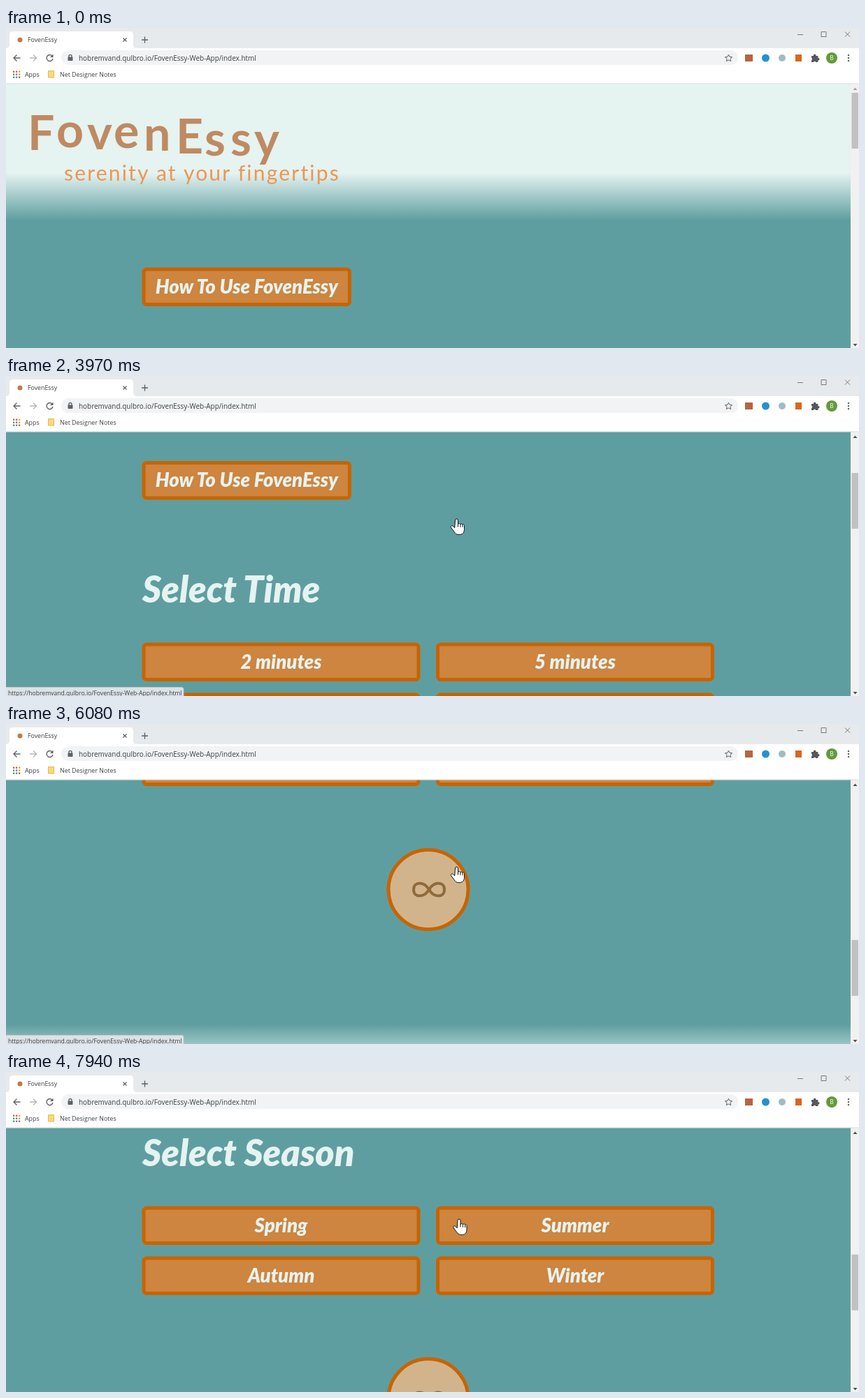
These frames come from a looping animation (1220x459 px, 8000 ms). An HTML page:

```html
<!DOCTYPE html>
<html lang="en">
<head>
<meta charset="utf-8">
<title>FovenEssy</title>
<style>
html, body { margin: 0; width: 100%; height: 100%; overflow: hidden; background: #fff; }
svg { display: block; width: 1220px; height: 459px; }
.ui { font-family: "Open Sans", "Noto Sans", sans-serif; fill: #3c4043; }
.script { font: italic 900 27.5px Lato, sans-serif; fill: #e5f3f1; }
.mid { text-anchor: middle; }
.title { font-size: 52px; }
.foot { fill: #c86400; }
.at { font: 800 57px "Open Sans", sans-serif; }
.brand { font: 700 68px Lato, sans-serif; fill: #bf8a61; }
.tag { font: 400 30px Lato, sans-serif; letter-spacing: 2.2px; fill: #ef9550; }
.btn { fill: #cd853f; stroke: #c86400; stroke-width: 5; }
.line { fill: none; stroke: #5f6368; stroke-width: 1.4; }
</style>
</head>
<body>
<svg viewBox="0 0 1220 459">
  <defs>
    <linearGradient id="sky" gradientUnits="userSpaceOnUse" x1="0" y1="0" x2="0" y2="2000">
      <stop offset=".104" stop-color="#e5f3f1"/>
      <stop offset=".138" stop-color="#5f9ea0"/>
      <stop offset=".7365" stop-color="#5f9ea0"/>
      <stop offset=".768" stop-color="#e5f3f1"/>
    </linearGradient>
  </defs>

  <g id="page">
    <rect width="1208" height="2000" fill="url(#sky)"/>
    <text class="brand" x="31 72 116 154 197 243 284 321 355" y="175 171 174 172 176 180 183 183 184">FovenEssy</text>
    <text class="tag" x="83" y="219">serenity at your fingertips</text>
    <g id="buttons"></g>
    <text class="script title" x="195" y="546.5">Select Time</text>
    <text class="script title" x="195" y="945.5">Select Season</text>
    <circle cx="604" cy="1279.5" r="57" fill="#d2b48c" stroke="#c86400" stroke-width="5"/>
    <path d="M605 1279.5c-7-12-22-12-22 0s15 12 22 0s22-12 22 0s-15 12-22 0z" fill="none" stroke="#8f6a3c" stroke-width="4"/>
    <g class="script mid" id="footer">
      <text class="foot" id="link" x="604" y="1522">www.Fovenessy.com</text>
      <text class="foot" x="604" y="1661">©FovenEssy 2020</text>
      <text class="foot" x="604" y="1701">All rights reserved</text>
      <text class="foot" x="605" y="1740">Web App built by Bram Toldever</text>
    </g>
    <text class="foot mid at" x="730" y="1593">@</text>
  </g>

  <g id="scrollbar">
    <rect x="1208" y="80" width="12" height="379" fill="#f1f1f1"/>
    <rect id="thumb" x="1209.5" y="93" width="9.5" height="80" fill="#c1c1c1"/>
    <path id="up" d="M1211.5 89l3-3.5 3 3.5z"/>
    <path id="down" d="M1211.5 453l3 3.5 3-3.5z"/>
  </g>

  <g id="status" class="ui">
    <path d="M-1 446.5H251q3 0 3 3V460H-1z" fill="#dee1e6" stroke="#c4c8cc" stroke-width=".8"/>
    <text x="3" y="457.5" font-size="8.6">https://hobremvand.qulbro.io/FovenEssy-Web-App/index.html</text>
  </g>

  <g id="browser" class="ui">
    <rect width="1220" height="30" fill="#e7eaed"/>
    <rect y="29" width="1220" height="51" fill="#fff"/>
    <rect y="79.3" width="1220" height="1.2" fill="#dfe2e4"/>
    <path d="M0 29q5 0 5-5V10q0-5 5-5H177q5 0 5 5V24q0 5 5 5z" fill="#fff"/>
    <circle cx="20" cy="17" r="3.5" fill="#c4784a"/>
    <text x="31" y="20" font-size="8.8">FovenEssy</text>
    <path class="line" d="M167.500 14.500l5 5m0-5l-5 5M194 17h9m-4.500-4.500v9"/>
    <path d="M1132 9.500h8M1166 5.500h7v7h-7zM1200 5.500l7 7m0-7l-7 7" fill="none" stroke="#777"/>
    <path class="line" d="M20.500 43H11m4.500-4.500L11 43l4.500 4.500"/>
    <path class="line" style="stroke:#b4b7ba" d="M34 43h9.500M39 38.500l4.500 4.500-4.500 4.500"/>
    <path class="line" d="M66 40a4.500 4.500 0 1 0 1 4"/>
    <path d="M67.500 37.500v4.500h-4.500z" fill="#5f6368"/>
    <rect x="79" y="32" width="968" height="21" rx="10.5" fill="#f1f3f4"/>
    <rect x="88.5" y="41.5" width="7" height="5.5" rx=".8" fill="#5f6368"/>
    <path class="line" d="M90 42v-1.500a2 2 0 0 1 4 0V42"/>
    <text x="104" y="46.5" font-size="9.95">hobremvand.qulbro.io/FovenEssy-Web-App/index.html</text>
    <path class="line" style="stroke-width:1" d="M1033.500 38l1.500 3.400 3.600.3-2.700 2.400.8 3.600-3.200-1.900-3.200 1.900.8-3.600-2.700-2.400 3.600-.3z"/>
    <rect x="1057" y="38" width="11" height="10" fill="#b8643f"/>
    <circle cx="1086.5" cy="43" r="5.5" fill="#2492cf"/>
    <circle cx="1110" cy="43" r="5" fill="#9fbcc3"/>
    <rect x="1129" y="38" width="9" height="10" fill="#d9661f"/>
    <path d="M1152 40h3a1.800 1.800 0 1 1 3.400 0h3v3.200a1.700 1.700 0 1 1 0 3.300V49h-3.200a1.700 1.700 0 0 0-3.200 0h-3v-3a1.700 1.700 0 0 0 0-3.200z" fill="#54585c"/>
    <circle cx="1181" cy="43" r="8" fill="#639a3b"/>
    <text class="mid" x="1181" y="46" font-size="8.5" fill="#fff">B</text>
    <g id="dots"></g>
    <text x="27" y="69.5" font-size="8.9">Apps</text>
    <path d="M60.500 61.500h8v9.500h-8z" fill="#fbd977" stroke="#e3b94e"/>
    <text x="77" y="69.5" font-size="8.9">Net Designer Notes</text>
  </g>

  <g id="cursor" stroke="#111" fill="#fff" stroke-linejoin="round">
    <path id="arrow" d="M0 0v16l3.800-3.400 2.500 5.400 2.500-1.100-2.500-5.300H11z"/>
    <g id="hand">
      <path d="M-2 2a2 2 0 0 1 4 0v6c0-2 3.400-2 3.400.4c0-2 3.200-1.800 3.200.4c0-1.600 2.400-1.400 2.400.6v5c0 5-2 8-6.500 8h-2c-3 0-4.300-1.400-6-4l-4.200-5.600c-1.600-2.400.8-4 2.600-2.300l2.300 2.300z"/>
      <path d="M2 8v3.500M5.400 8.400v3.500M8.600 8.800V12" fill="none"/>
    </g>
  </g>
</svg>
<script>
const $ = id => document.getElementById(id);
const LOOP = 8000, MAX_SCROLL = 1326, TRAVEL = 276;

function add(parent, tag, attrs, text) {
  const el = document.createElementNS('http://www.w3.org/2000/svg', tag);
  for (const k in attrs) el.setAttribute(k, attrs[k]);
  if (text) el.textContent = text;
  parent.appendChild(el);
}

function button(x, y, w, label) {
  add($('buttons'), 'rect', { class: 'btn', x: x + 2.5, y: y + 2.5, width: w - 5, height: 50.5, rx: 4 });
  add($('buttons'), 'text', { class: 'script mid', x: x + w / 2, y: y + 37 }, label);
}

function grid(y, labels) {
  labels.forEach((s, i) => button(i % 2 ? 615 : 194.5, y + (i >> 1) * 72, 398, s));
}

button(194.5, 343.5, 299.5, 'How To Use FovenEssy');
grid(604, [2, 5, 10, 20, 30, 60].map(n => n + ' minutes'));
grid(1003.5, ['Spring', 'Summer', 'Autumn', 'Winter']);

for (let i = 0; i < 4; i++)
  add($('page'), 'rect', { x: 452 + i * 63.6, y: 1555.5, width: 42, height: 42, rx: 4, fill: '#c86400' });

const tints = ['#d9503f', '#d9503f', '#e0a52e', '#4a9a58', '#4383c9', '#e0a52e', '#4a9a58', '#4383c9', '#d9503f'];
tints.forEach((fill, i) =>
  add($('dots'), 'rect', { x: 10 + (i % 3) * 4, y: 61.5 + Math.floor(i / 3) * 4, width: 2.3, height: 2.3, fill }));
for (let i = 0; i < 3; i++)
  add($('dots'), 'circle', { cx: 1205, cy: 39 + i * 4, r: 1.2, fill: '#5f6368' });

// Number of steps taken so far between times a and b (n in all).
const step = (t, a, b, n) =>
  t < a ? 0 : Math.min(n, 1 + Math.floor((t - a) / (b - a) * (n - 1) + 0.01));

// Wheel gestures: start, end, scroll offset after each step.
const wheel = [
  [3500, 3970, [8, 42, 84, 126, 168, 206, 221.5]],
  [4350, 4900, [230, 268, 312, 358, 405, 450.5, 495, 516.6]],
  [5060, 5290, [528, 600, 690, 738]],
  [5520, 5850, [744.5, 810, 905, 990, 1033]],
  [6080, 6400, [1042, 1120, 1220, 1300, MAX_SCROLL]],
  [7180, 7940, [1320, 1285, 1230, 1180, 1125, 1070, 1010, 955, 900, 850, 811]]
];

function scrollAt(t) {
  let pos = 0;
  for (const [a, b, stops] of wheel) {
    const k = step(t, a, b, stops.length);
    if (k) pos = stops[k - 1];
  }
  return pos;
}

function drawCursor(t, hover) {
  const k = step(t, 1040, 1710, 10);
  const enter = 1 - (1 - Math.max(0, k - 1) / 9) ** 2;
  const nudge = step(t, 2110, 2260, 3) / 3;
  const drift = step(t, 7180, 7940, 11) / 11;
  const x = 1001 - 358 * enter + 1.5 * nudge + 1.5 * hover + 2 * drift;
  const y = 445 - 247 * enter + 7 * nudge + 3 * hover + 3 * drift;
  const onLink = y < 240;
  $('cursor').setAttribute('visibility', k ? 'visible' : 'hidden');
  $('cursor').setAttribute('transform', `translate(${x} ${y})`);
  $('arrow').style.display = onLink ? 'none' : '';
  $('hand').style.display = onLink ? '' : 'none';
}

function draw(t) {
  const pos = scrollAt(t);
  const hover = step(t, 6860, 7010, 3) / 3;
  $('page').setAttribute('transform', `translate(0 ${-pos})`);
  $('thumb').setAttribute('y', 93 + pos / MAX_SCROLL * TRAVEL);
  $('up').setAttribute('fill', pos > 0 ? '#505050' : '#a3a3a3');
  $('down').setAttribute('fill', pos < MAX_SCROLL ? '#505050' : '#a3a3a3');
  $('status').setAttribute('opacity', t < 7260 ? step(t, 1860, 1940, 2) / 2 : 0);
  const lit = t < 7260 ? hover : 0;
  $('link').style.fill = `rgb(${200 + 5 * lit}, ${100 + 33 * lit}, ${63 * lit})`;
  drawCursor(t, hover);
}

const start = performance.now();
function tick() {
  draw((performance.now() - start) % LOOP);
  requestAnimationFrame(tick);
}
tick();
</script>
</body>
</html>
```
